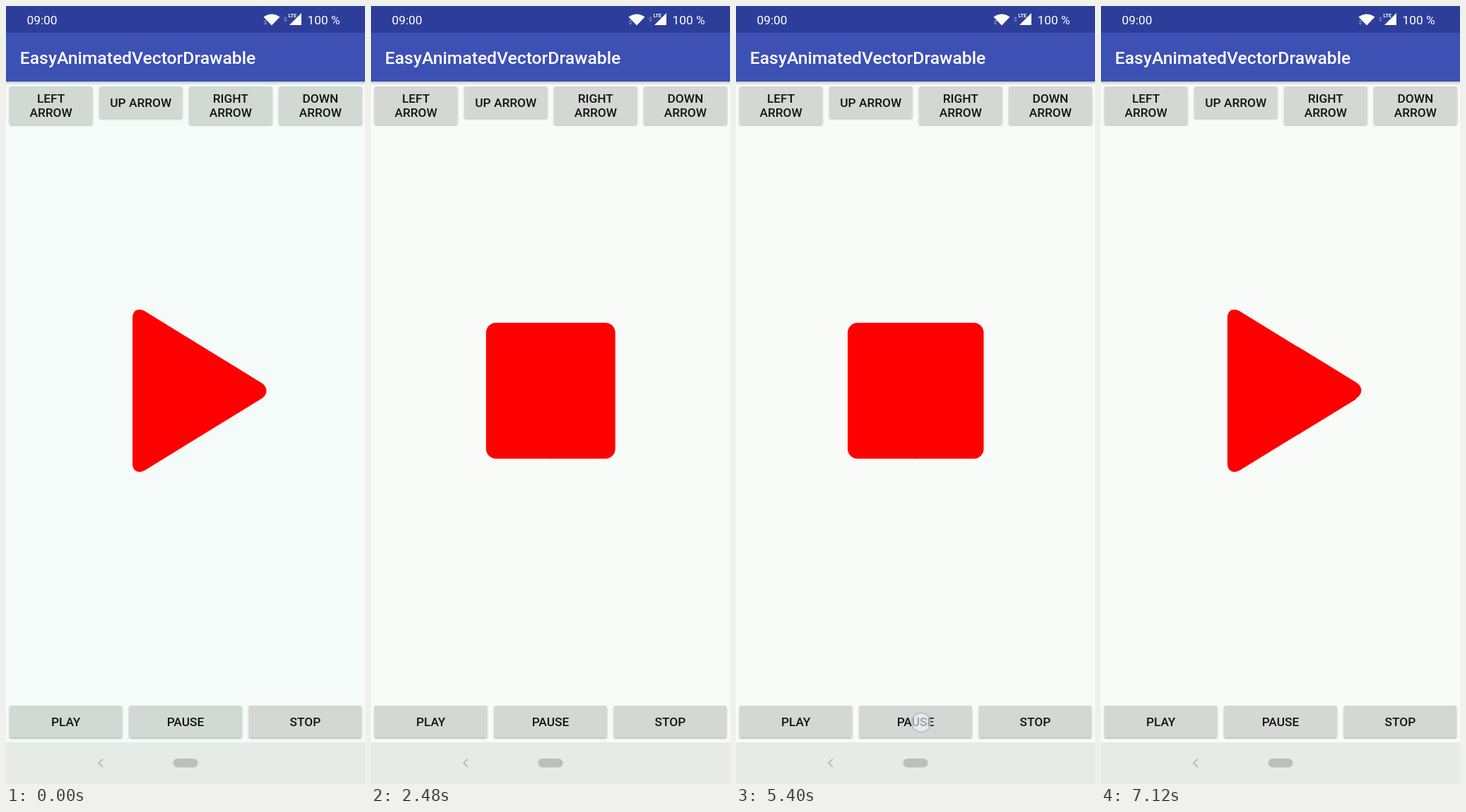
These frames come from a looping animation (508x1102 px, 7160 ms). An HTML page:

```html
<!DOCTYPE html>
<html lang="en">
<head>
<meta charset="utf-8">
<title>EasyAnimatedVectorDrawable</title>
<style>
html, body { margin: 0; width: 100%; height: 100%; overflow: hidden; background: #f8fbf8; }
svg { display: block; width: 100%; height: 100%; font-family: Roboto, sans-serif; }
.label { font-size: 17.3px; font-weight: 500; fill: #111411; text-anchor: middle; }
.status { font-size: 17.3px; fill: #fff; }
</style>
</head>
<body>
<svg id="stage" viewBox="0 0 508 1102" preserveAspectRatio="none">
  <defs>
    <filter id="lift" x="-10%" y="-20%" width="120%" height="150%">
      <feDropShadow dx="0" dy="1.6" stdDeviation="1.3" flood-color="#000" flood-opacity=".28"/>
    </filter>
    <linearGradient id="fade" x2="0" y2="1">
      <stop offset="0" stop-color="#000" stop-opacity=".2"/>
      <stop offset="1" stop-color="#000" stop-opacity="0"/>
    </linearGradient>
    <clipPath id="pressed"><rect id="pressedBox" y="991" width="160" height="45" rx="2.5"/></clipPath>
  </defs>
  <rect id="page" width="508" height="1102"/>
  <rect y="107" width="508" height="5" fill="url(#fade)"/>
  <rect width="508" height="107" fill="#3d50b4"/>
  <rect width="508" height="38" fill="#2d3e9a"/>
  <text class="status" x="29.5" y="25.5">09:00</text>
  <text class="status" x="426.5" y="25.5">100 %</text>
  <g fill="#fff">
    <path d="M364.5 15.5Q376 7.5 387.5 15.5L376 27.5Z"/>
    <path d="M418 10V27H401Z"/>
    <text x="399.5" y="16.3" font-size="7" font-weight="700">LTE</text>
  </g>
  <g fill="#7783c2">
    <path d="M364.5 22.5L367 19.5L369.5 22.5ZM364.5 24L367 27L369.5 24Z"/>
    <path d="M393 18L395.5 15L398 18ZM393 19.5L395.5 22.5L398 19.5Z"/>
  </g>
  <text x="19.8" y="82" font-size="24.7" font-weight="500" fill="#fff">EasyAnimatedVectorDrawable</text>
  <g id="buttons" filter="url(#lift)"></g>
  <g clip-path="url(#pressed)"><circle id="ripple"/></g>
  <g id="labels"></g>
  <path id="left" fill="#f00"/>
  <path id="right" fill="#f00"/>
  <rect y="1043" width="508" height="59" fill="#e6ebe6"/>
  <path d="M137 1066.5L131 1072.3L137 1078" fill="none" stroke="#b8bdb8" stroke-width="1.9"/>
  <rect x="236.5" y="1066" width="35" height="12.5" rx="6.2" fill="#bbc0bc"/>
  <circle id="touch" r="13.5" fill="#f2f3fa" fill-opacity=".62" stroke="#a9adbd" stroke-opacity=".75" stroke-width="1.6"/>
</svg>
<script>
const LOOP = 7160, STEP = 40, MORPH = 590, SLIDE = 470, TRAVEL = 34, MID_Y = 545;
const el = id => document.getElementById(id);

function add(parent, tag, attrs, text = '') {
  const node = document.createElementNS('http://www.w3.org/2000/svg', tag);
  for (const key in attrs) node.setAttribute(key, attrs[key]);
  node.textContent = text;
  parent.append(node);
  return node;
}

function button(x, y, w, h, lines) {
  const rect = add(el('buttons'), 'rect', { x, y, width: w, height: h, rx: 2.5 });
  lines.forEach((line, i) => add(el('labels'), 'text', {
    class: 'label', x: x + w / 2, y: y + h / 2 + 6.3 + (i - (lines.length - 1) / 2) * 20.3
  }, line));
  return rect;
}

const buttons = [['LEFT', 'ARROW'], ['UP ARROW'], ['RIGHT', 'ARROW'], ['DOWN', 'ARROW']]
  .map((lines, i) => button(4.7 + i * 127.1, 114, 117.8, lines.length > 1 ? 53.5 : 44.5, lines));
buttons.push(...['PLAY', 'PAUSE', 'STOP'].map((name, i) => button(4.7 + i * 169.4, 991, 159.8, 45, [name])));

// A corner is one cubic curve; a piece is four corners, clockwise from top left.
const point = (x, y) => [x, y, x, y, x, y, x, y];
const mirror = c => [6, 4, 2, 0].flatMap(i => [c[i], 2 * MID_Y - c[i + 1]]);
const symmetric = (tl, tr) => [tl, tr, mirror(tr), mirror(tl)];

function box(l, r, top, rl, rr) {
  const k = 0.45;
  return symmetric(
    [l, top + rl, l, top + rl * k, l + rl * k, top, l + rl, top],
    [r - rr, top, r - rr * k, top, r, top + rr * k, r, top + rr]);
}

const SHAPES = {
  play: [
    symmetric([179, 442, 179, 432, 186, 427, 196, 432], point(278.4, 482.7)),
    [point(277.6, 482.2), [361, 533.5, 371, 539.5, 371, 550.5, 361, 556.5],
      point(361, 556.5), point(277.6, 607.8)]
  ],
  pause: [box(158, 220, 438.5, 10, 10), box(288.5, 350.5, 438.5, 10, 10)],
  stop: [box(158, 255, 448.8, 14, 0), box(253.5, 350.5, 448.8, 0, 14)]
};

const TAPS = [
  { at: 1080, from: 'play', to: 'pause', x: 291, y: 1007 },
  { at: 2040, from: 'pause', to: 'stop', x: 430, y: 1013 },
  { at: 3200, from: 'stop', to: 'play', x: 92, y: 1013 },
  { at: 4240, from: 'play', to: 'stop', x: 430, y: 1014.5 },
  { at: 5400, from: 'stop', to: 'pause', x: 262, y: 1015 },
  { at: 6560, from: 'pause', to: 'play', x: 92, y: 1013 }
];
const SLOT = { play: 0, pause: 1, stop: 2 };

const clamp = v => Math.min(1, Math.max(0, v));
const ease = v => (1 - Math.cos(Math.PI * clamp(v))) / 2;

function outline(a, b, f, outer, shift) {
  const d = a.map((corner, i) => {
    const c = corner.map((v, j) =>
      v + (b[i][j] - v) * f + (j % 2 === 0 && outer.includes(i) ? shift : 0));
    return `${i ? 'L' : 'M'}${c[0]} ${c[1]}C${c.slice(2).join(' ')}`;
  });
  return d.join('') + 'Z';
}

function drawIcon(tap, age) {
  const { from, to } = tap;
  let f = ease(age / MORPH), shift = 0;
  // Bars slide ahead of their change in width.
  if (from !== 'play' && to !== 'play') {
    const slide = ease(age / SLIDE);
    shift = TRAVEL * (slide - f) * (to === 'stop' ? 1 : -1);
    f = slide;
  }
  const [l0, r0] = SHAPES[from], [l1, r1] = SHAPES[to];
  el('left').setAttribute('d', outline(l0, l1, f, [0, 3], shift));
  el('right').setAttribute('d', outline(r0, r1, f, [1, 2], -shift));
}

function drawTouch(tap, age) {
  const on = age >= 0;
  el('pressedBox').setAttribute('x', 4.7 + SLOT[tap.to] * 169.4);
  for (const id of ['touch', 'ripple']) {
    el(id).setAttribute('cx', tap.x);
    el(id).setAttribute('cy', tap.y);
  }
  el('touch').setAttribute('opacity', on ? clamp((340 - age) / 170) : 0);
  el('ripple').setAttribute('r', 170 * clamp(age / 200));
  el('ripple').setAttribute('opacity', on ? 0.13 * clamp((440 - age) / 180) : 0);
}

function draw(ms) {
  const t = Math.floor(ms % LOOP / STEP) * STEP;
  const tap = TAPS.filter(p => p.at <= t).pop() || TAPS[0];
  const age = t - tap.at;
  const early = t < TAPS[0].at;
  el('page').setAttribute('fill', early ? '#f5fbf8' : '#f8fbf8');
  buttons.forEach((b, i) => b.setAttribute('fill', early && i < 6 ? '#d1d9d4' : '#d5d7d5'));
  drawIcon(tap, age);
  drawTouch(tap, age);
}

const start = performance.now();
function tick() {
  draw(performance.now() - start);
  requestAnimationFrame(tick);
}
tick();
</script>
</body>
</html>
```
